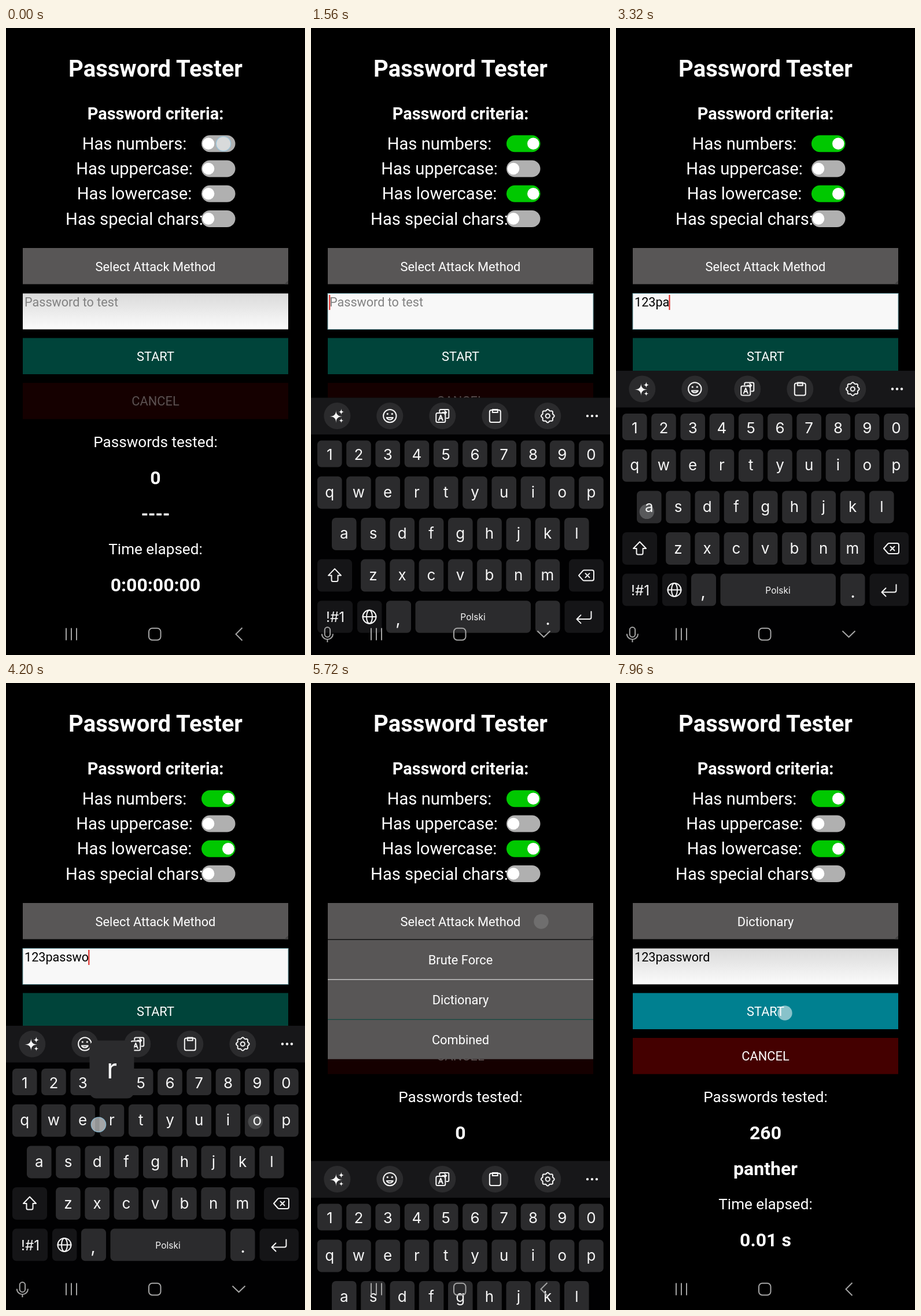
These frames come from a looping animation (517x1083 px, 8 s). An HTML page:

```html
<!DOCTYPE html>
<html lang="en">
<head>
<meta charset="utf-8">
<title>Password Tester</title>
<style>
  html, body { margin: 0; width: 100%; height: 100%; overflow: hidden; background: #000; }
  svg { display: block; width: 517px; height: 1083px; }
  text { font-family: Roboto, sans-serif; fill: #fff; text-anchor: middle; white-space: pre; }
  .bold { font-weight: 700; }
  .label { font-size: 29.2px; }
  .button { font-size: 21.8px; }
  .caption { font-size: 26.1px; }
  .value { font-size: 32px; font-weight: 700; }
  .entry { font-size: 21.6px; text-anchor: start; }
  .face { fill: #585656; }
  .key { fill: #2b2b2d; }
  .dark { fill: #151517; }
  #board text, #popup text { font-family: Inter, sans-serif; fill: #f6f6f6; }
  .icon { fill: none; stroke: #f6f6f6; stroke-width: 2; stroke-linecap: round; stroke-linejoin: round; }
  .solid { fill: #f6f6f6; stroke: none; }
  #nav { fill: none; stroke: #a4a4a4; stroke-width: 2; }
</style>
</head>
<body>
<svg viewBox="0 0 517 1083">
  <defs>
    <linearGradient id="fade" x2="0" y2="1">
      <stop stop-color="#dadada"/><stop offset="1" stop-color="#fbfbfb"/>
    </linearGradient>
  </defs>
  <rect width="517" height="1083"/>
  <text class="bold" x="258.5" y="84" font-size="40">Password Tester</text>
  <text class="bold" x="258.5" y="157.5" font-size="28.9">Password criteria:</text>
  <g id="criteria"></g>

  <rect id="method" class="face" x="29" y="380" width="459" height="62.5"/>
  <path d="M488 436v6.5h-6.5z" fill="#454444"/>
  <text id="methodText" class="button" x="258.5" y="419.6"></text>

  <rect id="field" x="29" y="458.5" width="459" height="62"/>
  <text id="entry" class="entry" x="32" y="481.3"></text>
  <rect id="cursor" y="461" width="2" height="26" fill="#e02420"/>

  <rect id="start" x="29" y="535.5" width="459" height="62.5"/>
  <text class="button" x="258.5" y="574.8">START</text>
  <rect id="cancel" x="29" y="613" width="459" height="62.5"/>
  <text id="cancelText" class="button" x="258.5" y="652.3">CANCEL</text>

  <text class="caption" x="258.5" y="724">Passwords tested:</text>
  <text id="count" class="value" x="258.5" y="788"></text>
  <text id="guess" class="value" x="258.5" y="849.5"></text>
  <text class="caption" x="258.5" y="909.3">Time elapsed:</text>
  <text id="elapsed" class="value" x="258.5" y="973"></text>

  <g id="menu"></g>
  <g id="board"></g>
  <g id="popup">
    <rect class="key" width="77" height="100" rx="12"/>
    <text x="38.5" font-size="48"></text>
  </g>

  <g id="nav">
    <path d="M104 1036.5v21M113 1036.5v21M122 1036.5v21"/>
    <rect x="247" y="1036.7" width="20.5" height="20.5" rx="6"/>
    <path id="back" d="M408.5 1036L397.5 1047L408.5 1058"/>
    <g id="down">
      <path d="M391.5 1041.5L402.5 1052L413.5 1041.5"/>
      <rect x="23.7" y="1035" width="9.4" height="17" rx="4.7"/>
      <path d="M18.8 1046.5a9.6 9.6 0 0 0 19.2 0M28.4 1056v5"/>
    </g>
  </g>
  <g id="dots"></g>
</svg>
<script>
const LOOP = 8000;
const $ = id => document.getElementById(id);
const between = (t, a, b) => t >= a && t < b;
const clamp = (v, lo = 0, hi = 1) => Math.min(hi, Math.max(lo, v));
const easeOut = (p, power) => 1 - (1 - clamp(p)) ** power;
const show = (node, on) => node.setAttribute('visibility', on ? 'visible' : 'hidden');
const setText = (node, s) => { if (node.textContent !== s) node.textContent = s; };

// Timeline, in ms
const FOCUS = 1200, BOARD_IN = 1360, METHOD_DOWN = 5440, METHOD_UP = 5600;
const PICK_DOWN = 6840, PICK_UP = 7000, START_DOWN = 7880, RESULT = 7960;
const PRESSED = '#32a4ce';

const switches = [
  { label: 'Has numbers:', x: 222, y: 199.8, on: 80 },
  { label: 'Has uppercase:', x: 222, y: 243, on: Infinity },
  { label: 'Has lowercase:', x: 222, y: 286.2, on: 600 },
  { label: 'Has special chars:', x: 222, y: 329.4, on: Infinity },
];
$('criteria').innerHTML = switches.map(s => `
  <text class="label" x="${s.x}" y="${s.y + 10.2}">${s.label}</text>
  <rect x="338" y="${s.y - 14.5}" width="58.5" height="29" rx="14.5"/>
  <circle cy="${s.y}" r="10.3" fill="#fff"/>`).join('');
const tracks = $('criteria').querySelectorAll('rect');
const knobs = $('criteria').querySelectorAll('circle');

$('menu').innerHTML = ['Brute Force', 'Dictionary', 'Combined'].map((name, i) => `
  <rect class="face" x="29" y="${443.7 + 69 * i}" width="459" height="68"/>
  <text class="button" x="258.5" y="${485.8 + 69 * i}">${name}</text>`).join('');
const choice = $('menu').querySelectorAll('rect')[1];

// Keyboard
const keys = {};
const cap = (x, y, w, h, cls = 'key') =>
  `<rect class="${cls}" x="${x}" y="${y}" width="${w}" height="${h}" rx="7"/>`;
const glyph = (s, x, y, size = 26) => `<text x="${x}" y="${y}" font-size="${size}">${s}</text>`;
const icon = (x, y, body) => `<g class="icon" transform="translate(${x} ${y})">${body}</g>`;

function row(chars, x0, y, h, base) {
  return [...chars].map((c, i) => {
    const x = x0 + 50.25 * i;
    keys[c] = { x, y, h };
    return cap(x - 21.3, y, 42.6, h) + glyph(c, x, y + base);
  }).join('');
}
function gear() {
  const points = Array.from({ length: 72 }, (_, i) => {
    const a = i * Math.PI / 36, r = 10.4 + Math.cos(8 * a);
    return `${(r * Math.cos(a)).toFixed(1)} ${(r * Math.sin(a)).toFixed(1)}`;
  });
  return `<path d="M${points.join('L')}Z"/><circle r="3.6"/>`;
}
const star = (x, y, r) =>
  `<path class="solid" d="M${x} ${y - r}Q${x} ${y} ${x + r} ${y}Q${x} ${y} ${x} ${y + r}Q${x} ${y} ${x - r} ${y}Q${x} ${y} ${x} ${y - r}"/>`;

const tools = [
  star(-2, 1, 11) + star(7, -7, 5.5) + star(7, 8, 4.5),
  '<circle r="11.2"/><path d="M-5.5 3a6.2 6.2 0 0 0 11 0z"/><circle class="solid" cx="-4" cy="-3.5" r="1.6"/><circle class="solid" cx="4" cy="-3.5" r="1.6"/>',
  '<path d="M-5-7V-9q0-2 2-2H9q2 0 2 2V2q0 2-2 2H7M7-6H0M4-9l3 3-3 3"/><rect x="-11" y="-5" width="16" height="16" rx="2.5"/><path d="M-6.5 7.5L-3-1.5L.5 7.5M-5.3 4.5H-.7"/>',
  '<rect x="-9.5" y="-10" width="19" height="21" rx="3"/><path d="M-4.5-11v5h9v-5z"/>',
  gear(),
];

$('board').innerHTML =
  '<rect y="592" width="517" height="620" fill="#010102"/><rect y="592" width="517" height="63.5" fill="#171719"/>' +
  tools.map((body, i) => `<circle class="key" cx="${45.3 + 91 * i}" cy="623.5" r="23"/>` + icon(45.3 + 91 * i, 623.5, body)).join('') +
  [478, 486, 494].map(x => `<circle class="solid" cx="${x}" cy="623.5" r="2.2"/>`).join('') +
  row('1234567890', 32.2, 666, 46, 33.7) +
  row('qwertyuiop', 32.2, 727.8, 56, 36.5) +
  row('asdfghjkl', 57.3, 799.4, 56, 36.5) +
  row('zxcvbnm', 107.4, 871, 56, 36.5) +
  cap(11, 871, 60, 56, 'dark') + icon(41, 899, '<path d="M0-11.5L11 0H5.5V8q0 2.5-2.5 2.5H-3q-2.500 0-2.500-2.500V0H-11z"/>') +
  cap(446, 871, 60, 56, 'dark') + icon(476, 899, '<path d="M-13 0L-6-8Q-5-9-3.500-9H10q3 0 3 3V6q0 3-3 3H-3.500Q-5 9-6 8zM-1.500-3.500l7 7M5.500-3.500l-7 7"/>') +
  cap(11, 942.6, 61, 55.6, 'dark') + glyph('!#1', 42, 979.5, 24) +
  cap(80, 942.6, 42.5, 55.6, 'dark') + icon(101, 970.5, '<circle r="11.500"/><ellipse rx="5" ry="11.500"/><path d="M-11.500 0h23"/>') +
  cap(130, 942.6, 43, 55.6) + glyph(',', 150.5, 984, 30) +
  cap(180.5, 942.6, 199.5, 55.6) + glyph('Polski', 280, 976.6, 15.5) +
  cap(388, 942.6, 42.500, 55.6) + glyph('.', 409.5, 984, 30) +
  cap(438.500, 942.6, 67.500, 55.6, 'dark') + icon(472, 970.5, '<path d="M12.500-9V1q0 3-3 3H-12M-5.500-3L-12.500 4l7 7"/>');

// Key presses: character, time, touch offset from the key centre
const presses = [
  ['1', 1960], ['2', 2290, -3, 14], ['3', 2540], ['p', 2920], ['a', 3120], ['s', 3330], ['s', 3540],
  ['w', 3760], ['o', 3980, -3, 2], ['r', 4150, -23, 7], ['d', 4580, -9, 12],
].map(([char, at, dx = -4, dy = 8]) => ({ char, at, dx, dy, key: keys[char] }));
const COMMIT = 100, POPUP = 180;

const touches = [
  { x: 376, y: 200, at: 0, hold: 80 },
  { x: 374, y: 287, at: 500, hold: 100 },
  { x: 330, y: 490, at: FOCUS, hold: 100 },
  ...presses.map(p => ({ x: p.key.x + p.dx, y: p.key.y + p.key.h / 2 + p.dy, at: p.at, hold: 100 })),
  { x: 398, y: 412, at: METHOD_DOWN, hold: 160 },
  { x: 300, y: 552, at: PICK_DOWN, hold: 130 },
  { x: 292, y: 570, at: START_DOWN, hold: 70 },
];
$('dots').innerHTML = touches.map(p =>
  `<circle cx="${p.x}" cy="${p.y}" r="12.7" fill="#f4f6f8" fill-opacity=".6" stroke="#8fc4e0" stroke-width="1.3"/>`).join('');
const dots = [...$('dots').children];

function drawEntry(t) {
  const typed = presses.filter(p => t >= p.at + COMMIT);
  const text = typed.map(p => p.char).join('');
  const focused = between(t, FOCUS, METHOD_DOWN);
  const entry = $('entry');
  setText(entry, text || 'Password to test');
  entry.style.fill = text ? '#000' : '#828282';
  $('field').setAttribute('fill', focused ? '#f8f8f8' : 'url(#fade)');
  $('field').setAttribute('stroke', focused ? '#6fa3ab' : 'none');
  const since = typed.length ? typed[typed.length - 1].at + COMMIT : FOCUS;
  $('cursor').setAttribute('x', 31.2 + (text ? entry.getComputedTextLength() : 0));
  show($('cursor'), focused && (t - since) % 1000 < 500);
}

function drawBoard(t) {
  const up = t < METHOD_UP
    ? easeOut((t - BOARD_IN) / 400, 3.4)
    : 1 - easeOut((t - METHOD_UP) / 320, 1.37);
  $('board').setAttribute('transform', `translate(0 ${492 * (1 - up)})`);
  show($('board'), up > 0);
  const open = between(t, BOARD_IN, METHOD_UP);
  show($('back'), !open);
  show($('down'), open);

  const press = presses.findLast(p => between(t, p.at, p.at + POPUP));
  show($('popup'), press);
  if (!press) return;
  const { x, y } = press.key;
  const label = $('popup').lastElementChild;
  $('popup').setAttribute('transform', `translate(${clamp(x - 38.5, 11, 429)} ${y - 110.3})`);
  label.setAttribute('y', press.char < 'a' ? 70.5 : 65.5);
  setText(label, press.char);
}

function draw(t) {
  switches.forEach((s, i) => {
    tracks[i].setAttribute('fill', t >= s.on ? '#00c800' : '#b0b0b0');
    knobs[i].setAttribute('cx', 350 + 34.3 * easeOut((t - s.on) / 200, 2));
  });
  drawEntry(t);
  drawBoard(t);

  $('method').style.fill = between(t, METHOD_DOWN, METHOD_UP) ? PRESSED : '';
  choice.style.fill = between(t, PICK_DOWN, PICK_UP) ? PRESSED : '';
  show($('menu'), between(t, METHOD_UP, PICK_UP));
  setText($('methodText'), t < PICK_UP ? 'Select Attack Method' : 'Dictionary');

  const done = t >= RESULT;
  $('start').setAttribute('fill', t >= START_DOWN ? '#008090' : '#00443a');
  $('cancel').setAttribute('fill', done ? '#440000' : '#150000');
  $('cancelText').style.fill = done ? '#fff' : '#5c5252';
  setText($('count'), done ? '260' : '0');
  setText($('guess'), done ? 'panther' : '----');
  setText($('elapsed'), done ? '0.01 s' : '0:00:00:00');

  touches.forEach((p, i) => {
    const age = t - p.at;
    dots[i].setAttribute('opacity', age < 0 ? 0 : 1 - clamp((age - p.hold) / 160));
    dots[i].setAttribute('stroke-opacity', age < p.hold ? .8 : 0);
  });
}

let origin;
function tick(now) {
  origin ??= now;
  draw((now - origin) % LOOP);
  requestAnimationFrame(tick);
}
draw(0);
requestAnimationFrame(tick);
</script>
</body>
</html>
```
